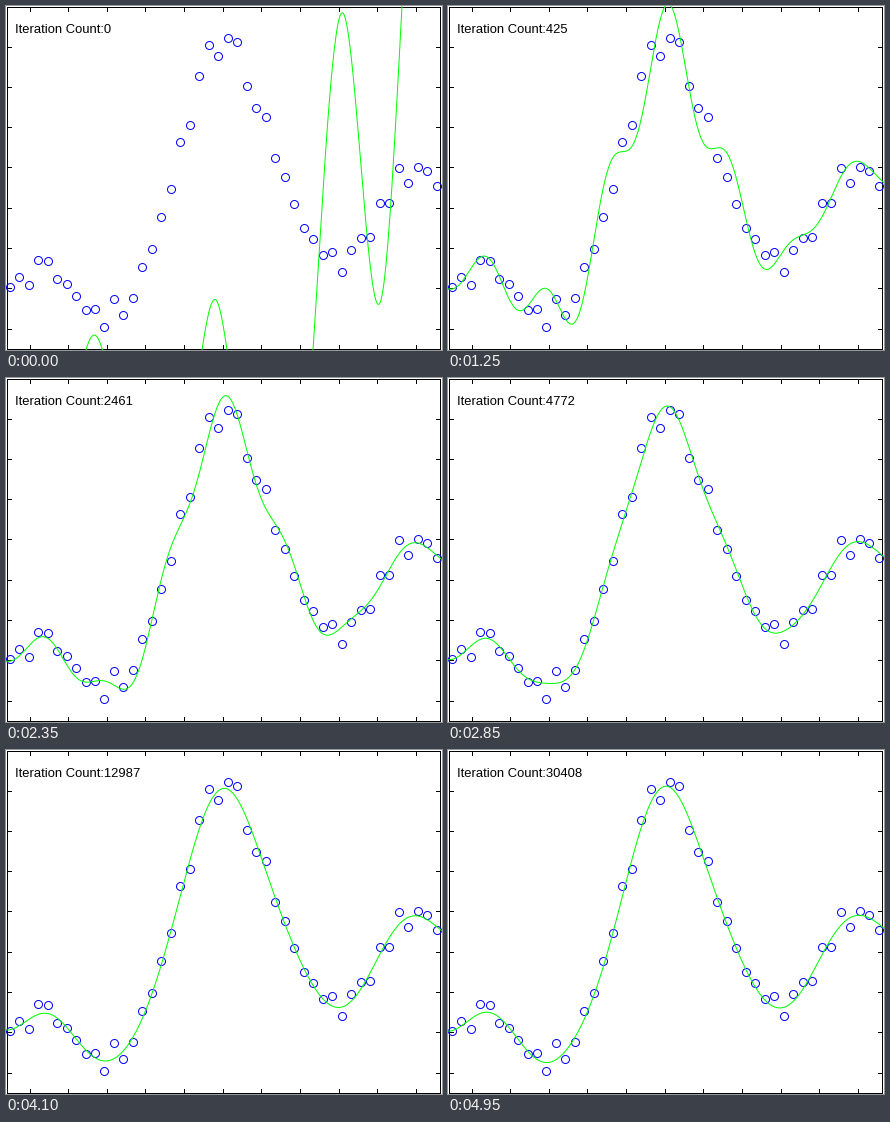
These frames come from a looping animation (436 px wide and 344 px high, 5 s). A matplotlib script:

```python
import numpy as np
import matplotlib.pyplot as plt
from matplotlib.animation import FuncAnimation

W, H, DPI = 436, 344, 100
FRAMES, INTERVAL = 100, 50
PX = 72 / DPI  # one pixel in points
LEFT, RIGHT, TOP, BOTTOM = 0.5, 433.5, 0.5, 342.5
GRID = np.linspace(0, W, 437)

# The noisy measurements that the curve learns
SAMPLES = np.array([
    281, 271, 279, 254, 255, 273, 278, 290, 304, 303, 321, 293, 309, 292, 261,
    243, 211, 183, 136, 119, 70, 39, 50, 32, 36, 80, 102, 111, 152, 171, 198,
    222, 233, 249, 246, 266, 244, 232, 231, 197, 197, 162, 177, 161, 165, 180])
SAMPLE_X = np.linspace(4.5, 431.5, len(SAMPLES))


def spline(*points):
    """Natural cubic spline through the points, sampled on GRID."""
    x, y = np.array(points, float).T
    h, n = np.diff(x), len(x)
    slope = np.diff(y) / h
    a, b = np.eye(n), np.zeros(n)
    for i in range(1, n - 1):
        a[i, i - 1:i + 2] = h[i - 1], 2 * (h[i - 1] + h[i]), h[i]
        b[i] = 6 * (slope[i] - slope[i - 1])
    m = np.linalg.solve(a, b)
    k = np.clip(np.searchsorted(x, GRID, side="right") - 1, 0, n - 2)
    t, hk = GRID - x[k], h[k]
    lin = slope[k] - hk * (2 * m[k] + m[k + 1]) / 6
    return y[k] + lin * t + m[k] * t**2 / 2 + (m[k + 1] - m[k]) * t**3 / (6 * hk)


# Radial basis network: ridge fit of the samples
centres = np.linspace(0, W, 15)


def basis(x, width=32):
    return np.exp(-((x[:, None] - centres) / width) ** 2 / 2)


phi, mean = basis(SAMPLE_X), SAMPLES.mean()
weights = np.linalg.solve(phi.T @ phi + 0.02 * np.eye(len(centres)),
                          phi.T @ (SAMPLES - mean))
fit = mean + basis(GRID) @ weights

# The slowest error mode alternates from one basis centre to the next
ripple = -45 * np.exp(-((GRID - 195) / 150) ** 2) * np.cos(2 * np.pi * (GRID - 221) / 62.3)

start = spline((0, 520), (30, 560), (60, 450), (88, 329), (116, 450),
               (165, 560), (196, 344), (210, 294), (221, 344), (265, 640),
               (307, 344), (320, 140), (337, 7), (375, 294), (396, 0),
               (436, -700))
early = spline((0, 620), (40, 344), (65, 239), (88, 196), (108, 258),
               (128, 336), (156, 212), (175, 181), (195, 116), (209, 0),
               (216, -18), (222, 0), (250, 344), (270, 458), (294, 344),
               (338, 62), (382, 347), (405, 190), (420, 0), (436, -130))

EARLY, SETTLED = 11, 25
COUNT_AT = {1: 1, EARLY: 42, SETTLED: 425, 47: 2461, 68: 8746, 82: 12987, 99: 30408}
LOG_TIMES = np.log(list(COUNT_AT))
LOG_COUNTS = np.log(list(COUNT_AT.values()))

# Training jitter in the basis weights
rng = np.random.default_rng(4)
jitter = rng.normal(0, 1.5, (FRAMES, len(centres))) @ basis(GRID, 20).T


def count_at(n):
    return round(np.exp(np.interp(np.log(n), LOG_TIMES, LOG_COUNTS))) if n else 0


def learned(count):
    return fit + ripple * np.exp(-count / 2700)


def mix(a, b, u):
    return (1 - u) * a + u * b


def curve_at(n):
    if n < EARLY:
        return mix(start, early, n / EARLY)
    if n < SETTLED:
        u = (n - EARLY) / (SETTLED - EARLY)
        return mix(early, learned(COUNT_AT[SETTLED]), u)
    return learned(count_at(n)) + jitter[n]


fig = plt.figure(figsize=(W / DPI, H / DPI), dpi=DPI, facecolor="white")
ax = fig.add_axes([0, 0, 1, 1])
ax.set_xlim(0, W)
ax.set_ylim(H, 0)
ax.axis("off")


def rule(xs, ys):
    ax.plot(xs, ys, color="black", lw=PX, antialiased=False, snap=True, zorder=1)


rule([LEFT, RIGHT, RIGHT, LEFT, LEFT], [TOP, TOP, BOTTOM, BOTTOM, TOP])
for i in range(11):
    x = 23.5 + 38.65 * i
    rule([x, x], [TOP, TOP + 4])
    rule([x, x], [BOTTOM, BOTTOM - 4])
for i in range(8):
    y = 40.5 + 40.3 * i
    rule([LEFT, LEFT + 4], [y, y])
    rule([RIGHT, RIGHT - 4], [y, y])

ax.plot(SAMPLE_X - 0.9, SAMPLES - 0.5, "o", ms=8 * PX, mfc="none",
        mec="#0000ff", mew=PX, antialiased=False, zorder=2)
line, = ax.plot([], [], color="#00ff00", lw=PX, zorder=3)
label = ax.text(9, 27, "", family="Liberation Sans", size=13 * PX,
                color="black", va="baseline", zorder=4)


def update(n):
    line.set_data(GRID, curve_at(n))
    label.set_text(f"Iteration Count:{count_at(n)}")
    return line, label


anim = FuncAnimation(fig, update, frames=FRAMES, interval=INTERVAL,
                     repeat=True, repeat_delay=0, blit=False)
plt.show()
```
